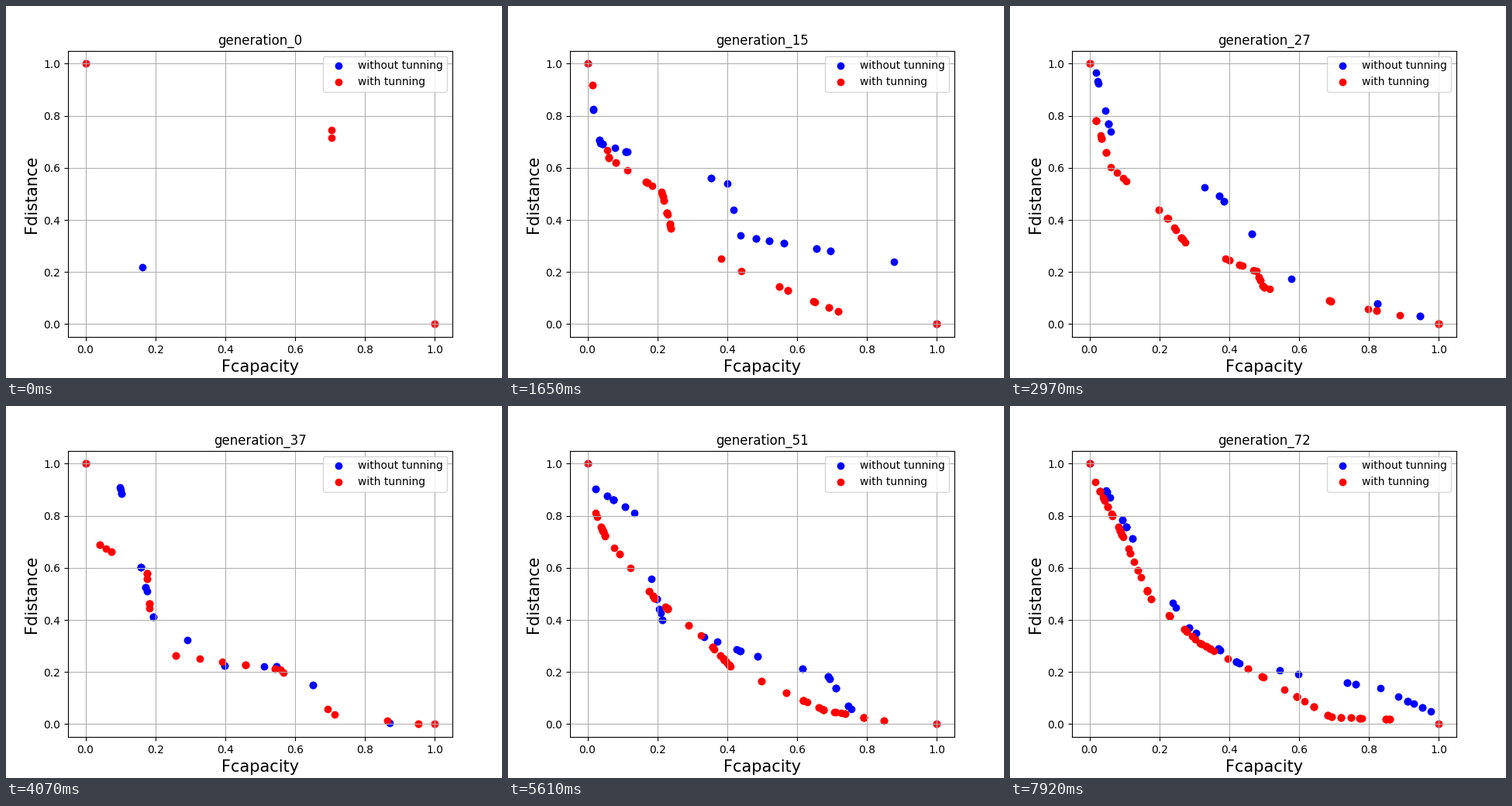
A matplotlib script that plays this animation: 640x480 px, repeating every 8 s.

```python
import numpy as np
import matplotlib.pyplot as plt
from matplotlib.animation import FuncAnimation

LOOP_MS = 8000
GENERATIONS = 73
rng = np.random.default_rng(7)


def front(extra, *corners):
    """Scatter extra members, and as many clones, along a line of corners."""
    x, y = np.array([(0, 1), *corners, (1, 0)]).T
    knots = np.arange(len(x))
    places = np.append(knots, rng.uniform(1, knots[-1] - 1, extra))
    places = np.sort(np.append(places, rng.choice(places, extra)))
    return np.column_stack([np.interp(places, knots, x),
                            np.interp(places, knots, y)])


# Turning points of the search: generation -> front.
blue_fronts = {
    0: front(0, (.163, .218)),
    15: front(13, (.017, .825), (.037, .694), (.400, .540), (.437, .340),
              (.877, .239)),
    27: front(8, (.018, .965), (.060, .739), (.372, .491), (.577, .173),
              (.945, .030)),
    37: front(8, (.099, .908), (.195, .412), (.397, .224), (.546, .220),
              (.870, .003)),
    51: front(16, (.023, .903), (.134, .810), (.214, .400), (.437, .281),
              (.688, .183), (.754, .057)),
    63: front(20, (.023, .998), (.099, .760), (.192, .742), (.284, .334),
              (.509, .236), (.879, .033)),
    72: front(18, (.048, .897), (.123, .712), (.284, .370), (.428, .233),
              (.832, .137), (.976, .048)),
}
red_fronts = {
    0: front(0, (.703, .745), (.705, .715)),
    15: front(20, (.014, .917), (.061, .638), (.212, .507), (.239, .367),
              (.441, .203), (.717, .049)),
    27: front(26, (.018, .780), (.061, .602), (.224, .406), (.274, .313),
              (.477, .203), (.499, .141), (.888, .033)),
    37: front(12, (.041, .688), (.176, .578), (.183, .444), (.259, .262),
              (.557, .209), (.714, .036), (.952, .000)),
    51: front(39, (.023, .810), (.050, .721), (.192, .483), (.325, .341),
              (.409, .221), (.676, .054), (.848, .012)),
    63: front(35, (.014, .976), (.021, .775), (.132, .534), (.250, .349),
              (.480, .176), (.619, .093), (.852, .006)),
    72: front(45, (.016, .929), (.083, .757), (.176, .479), (.317, .310),
              (.494, .182), (.692, .027), (.860, .018)),
}


def blend(points, other, weight):
    """Move points towards the other front, keeping their x."""
    x, y = points.T
    return np.column_stack([x, y + weight * (np.interp(x, *other.T) - y)])


def population(fronts, generation):
    """Old members give way to new ones while the whole front shifts."""
    if generation in fronts:
        return fronts[generation]
    before = max(g for g in fronts if g < generation)
    after = min(g for g in fronts if g > generation)
    t = (generation - before) / (after - before)
    old, new = fronts[before], fronts[after]
    # A member's turn depends only on x, so shared members never vanish.
    old_turn, new_turn = (p[:, 0] * 997.13 % 1 for p in (old, new))
    return np.vstack([
        blend(old, new, t)[old_turn >= t],
        blend(new, old, 1 - t)[new_turn < t],
    ])


fig, ax = plt.subplots(figsize=(6.4, 4.8), dpi=100)
blue_dots = ax.scatter([], [], color="blue", label="without tunning")
red_dots = ax.scatter([], [], color="red", label="with tunning")
ax.set(xlim=(-0.05, 1.05), ylim=(-0.05, 1.05))
ax.set_xlabel("Fcapacity", fontsize=15)
ax.set_ylabel("Fdistance", fontsize=15)
ax.grid(True)
ax.legend(loc="upper right")
title = ax.set_title("generation_0")


def update(generation):
    title.set_text(f"generation_{generation}")
    blue_dots.set_offsets(population(blue_fronts, generation))
    red_dots.set_offsets(population(red_fronts, generation))
    return title, blue_dots, red_dots


animation = FuncAnimation(fig, update, frames=GENERATIONS,
                          interval=LOOP_MS / GENERATIONS,
                          repeat=True, repeat_delay=0)
plt.show()
```
